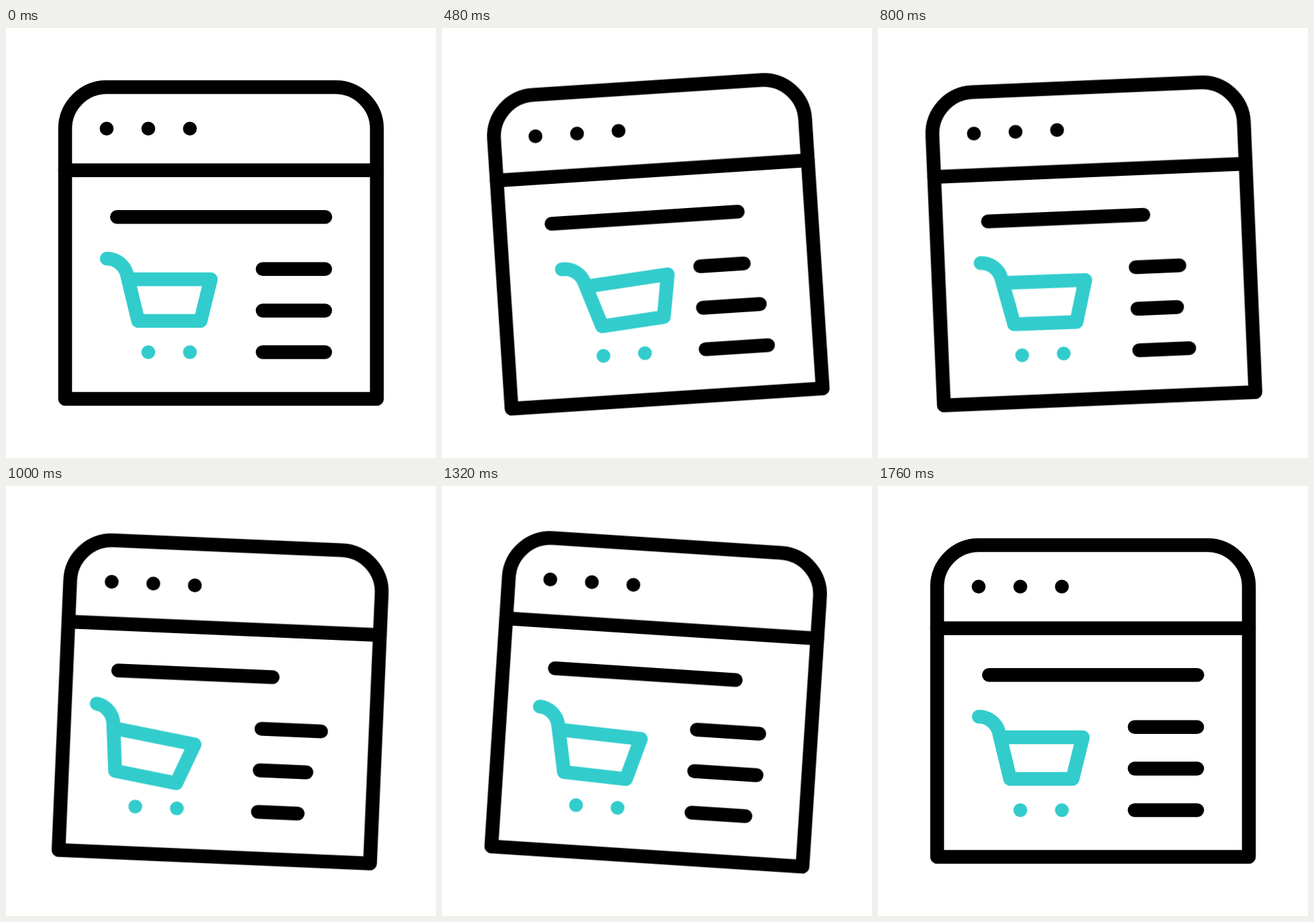
Animation of 640 by 640 pixels, one loop 1840 ms. Source, as an HTML page without scripts:

```html
<!DOCTYPE html>
<html lang="en">
<head>
<meta charset="utf-8">
<title>Shop window</title>
<style>
  html, body { margin: 0; width: 100%; height: 100%; overflow: hidden; background: #fff; }
  svg { display: block; width: 100vw; height: 100vh; }

  .pen { fill: none; stroke: #000; stroke-width: 20.6; stroke-linecap: round; stroke-linejoin: round; }
  .teal { stroke: #33cccc; }

  /* One shared loop; each part only names its own keyframes. */
  .move { animation: 1840ms cubic-bezier(.53, 0, .47, 1) infinite; }
  .window { transform-origin: 320px 320px; animation-name: rock; }
  .wheels { animation-name: roll; }
  .body { animation-name: slide; }
  .tilt { transform-origin: 227px 390px; animation-name: tilt; }
  .title { stroke-dasharray: 310 900; animation-name: title; }
  .row { stroke-dasharray: 93 900; animation-name: row; }
  .second { animation-delay: 158ms; }
  .third { animation-delay: 400ms; }

  @keyframes rock {
    0%, 2.45%, 95.4%, 100% { transform: rotate(0deg); }
    32.61% { transform: rotate(-4deg); }
    65.22% { transform: rotate(4deg); }
  }
  @keyframes roll {
    0%, 2.72%, 80.4%, 100% { transform: translateX(0); }
    28.8% { transform: translateX(18px); }
    52.7% { transform: translateX(-12.5px); }
  }
  @keyframes slide {
    0%, 4.89%, 81.52%, 100% { transform: translateX(0); }
    30.43% { transform: translateX(31px); }
    55.43% { transform: translateX(-23px); }
  }
  @keyframes tilt {
    0%, 7.61%, 82.61%, 100% { transform: rotate(0deg); }
    33.15% { transform: rotate(-5.5deg); }
    55.98% { transform: rotate(9deg); }
  }
  @keyframes title {
    0%, 6.52%, 93.48%, 100% { stroke-dasharray: 310 900; }
    50% { stroke-dasharray: 229 900; }
  }
  @keyframes row {
    0%, 7.61%, 61.96%, 100% { stroke-dasharray: 93 900; }
    34.78% { stroke-dasharray: 59 900; }
  }
</style>
</head>
<body>
<svg viewBox="0 0 640 640">
  <g class="pen move window">
    <path d="M149.9 88H490.1A62 62 0 0 1 552 150V552H88V150A62 62 0 0 1 149.9 88Z"/>
    <path d="M88 211.8H552"/>
    <path d="M149.8 149.8h.01M211.8 149.8h.01M273.7 149.8h.01"/>

    <path class="move title" d="M165.2 281.3h310"/>
    <path class="move row" d="M382 358.8h93"/>
    <path class="move row second" d="M382 420.6h93"/>
    <path class="move row third" d="M382 482.5h93"/>

    <g class="teal">
      <path class="move wheels" d="M211.8 482.5h.01M273.7 482.5h.01"/>
      <g class="move body">
        <path class="move tilt" d="M150 343.3A31 31 0 0 1 180 366.7L196.7 436H289.5L304.8 374H181.8"/>
      </g>
    </g>
  </g>
</svg>
</body>
</html>
```
